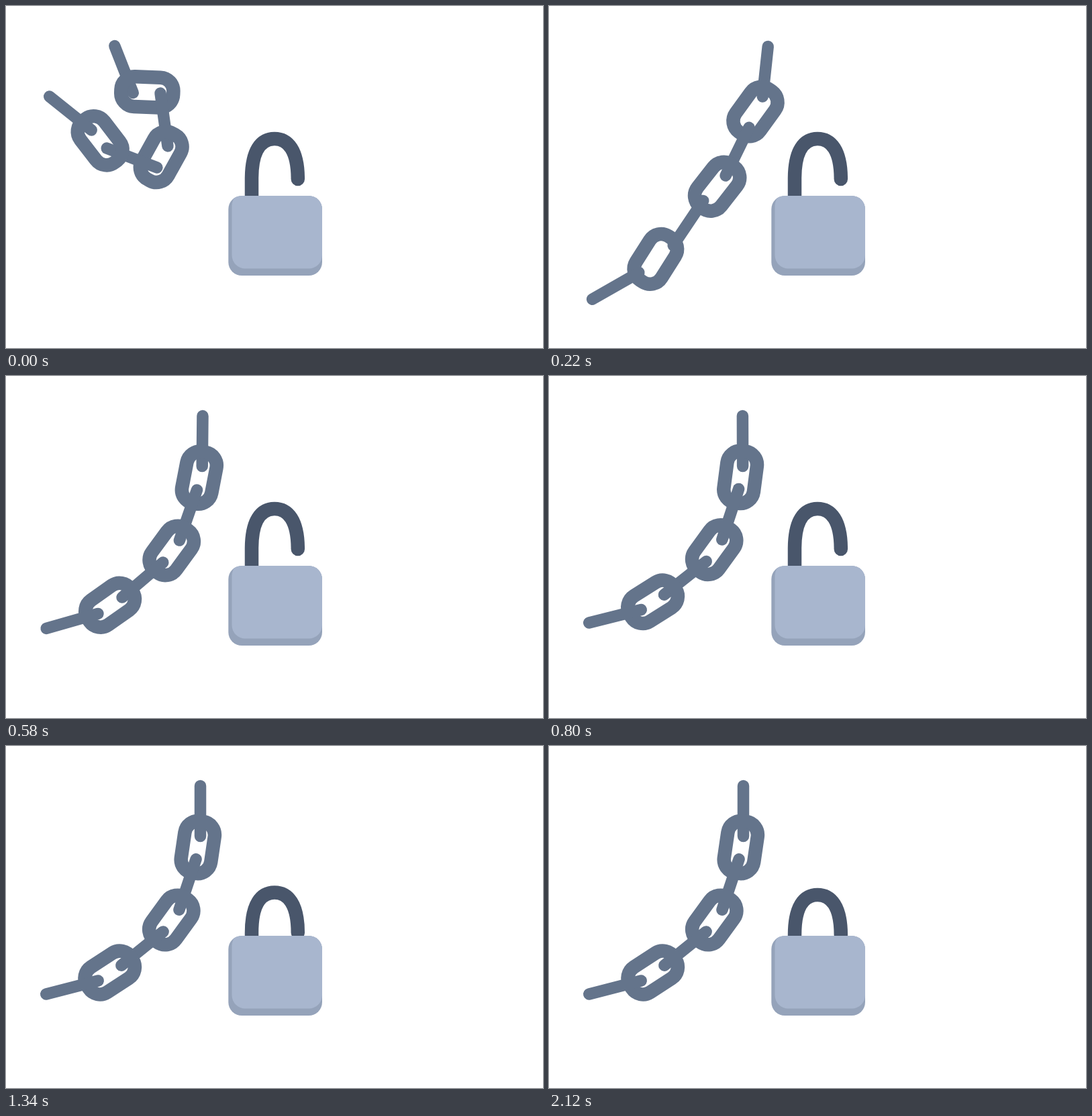
Recreate the animation shown at these times as an HTML page. Size 800x510 px, loop 2.22 s.

```html
<!DOCTYPE html>
<html lang="en">
<head>
<meta charset="utf-8">
<title>Chain and padlock</title>
<style>
  html, body { margin: 0; width: 100%; height: 100%; overflow: hidden; background: #fff; }
  svg { display: block; width: 100%; height: 100%; }
  #chain { fill: none; stroke: #64748b; stroke-linecap: round; }
</style>
</head>
<body>
<svg viewBox="0 0 800 510">
  <clipPath id="body"><rect x="331.3" y="283" width="139.7" height="119" rx="20"/></clipPath>
  <g id="chain"></g>
  <path id="shackle" d="M366 300V258C366 215 380 198 400 198S434.8 215 434.8 258"
        fill="none" stroke="#49566b" stroke-width="20.5" stroke-linecap="round"/>
  <g clip-path="url(#body)">
    <rect x="331" y="283" width="140" height="119" fill="#95a3ba"/>
    <rect x="336.5" y="278" width="134.5" height="113.5" rx="20" fill="#a8b6ce"/>
  </g>
</svg>
<script>
const LOOP = 2220, LOCK_AT = 1.235, LOCK_DROP = 24;
const chain = document.getElementById('chain');
const shackle = document.getElementById('shackle');

const bar = h => `<path d="M0 ${-h / 2}V${h / 2}" stroke-width="17.5"/>`;
const link = '<rect x="-22.4" y="-39" width="44.8" height="78" rx="20" stroke-width="20.5"/>';

// shape, start pose, end pose; a pose is x, y, degrees
const parts = [
  [bar(75), [175.5, 94.5, -21.4], [289.5, 97, 0]],
  [link, [210.3, 128.3, -87.8], [285.8, 151, 8.3]],
  [bar(79.5), [235.5, 169.5, -7.9], [270.5, 206.5, 18.4]],
  [link, [231.2, 225.2, 29], [246.3, 259.5, 36]],
  [bar(80), [187.5, 226.5, 111.1], [203, 302, 51.1]],
  [link, [140.2, 200.8, -37.5], [154.7, 338, -123]],
  [bar(80), [96, 160, 128.7], [98.5, 360, 75.5]]
];
chain.innerHTML = parts.map(([shape]) => `<g>${shape}</g>`).join('');

// Damped spring from 0 to 1, time in seconds
function spring(t) {
  if (t <= 0) return 0;
  const decay = 5.95, freq = 15.75;
  return 1 - Math.exp(-decay * t) * (Math.cos(freq * t) + decay / freq * Math.sin(freq * t));
}

function draw(now) {
  const t = now % LOOP / 1000, p = spring(t);
  parts.forEach(([, from, to], i) => {
    const [x, y, a] = from.map((v, k) => v + (to[k] - v) * p);
    chain.children[i].setAttribute('transform', `translate(${x} ${y}) rotate(${a})`);
  });
  shackle.setAttribute('transform', `translate(0 ${LOCK_DROP * spring(t - LOCK_AT)})`);
}

const start = performance.now();
function tick() {
  draw(performance.now() - start);
  requestAnimationFrame(tick);
}
tick();
</script>
</body>
</html>
```
